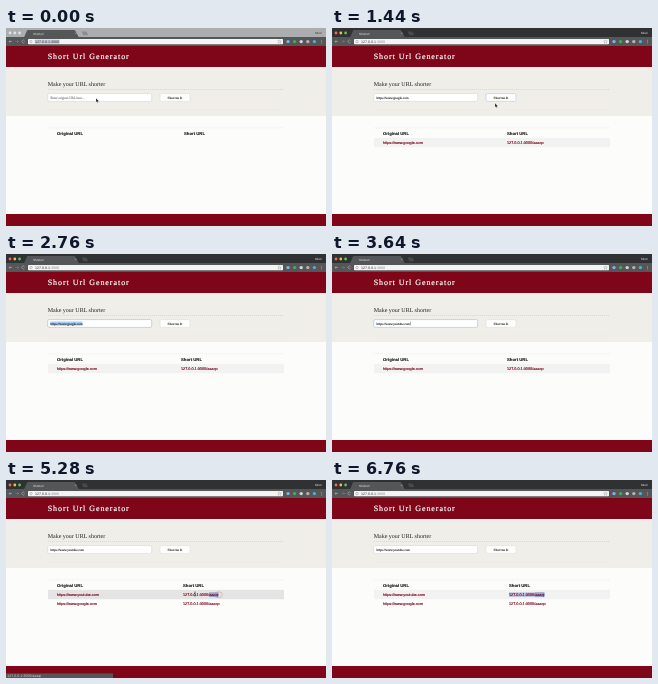
Animation, 320 px wide and 198 px high, one loop 6800 ms. Source, as an HTML page:

```html
<!DOCTYPE html>
<html lang="en">
<head>
<meta charset="utf-8">
<title>Short Url Generator</title>
<style>
html, body { margin: 0; width: 100%; height: 100%; overflow: hidden; background: #fbfcfb; }
svg { display: block; width: 100vw; height: 100vh; }
text { font-family: "Liberation Sans", Arial, sans-serif; font-size: 3.77px; text-rendering: geometricPrecision; white-space: pre; }
.serif { font-family: "Liberation Serif", Times, serif; }
.title { font-size: 8px; letter-spacing: .95px; fill: #fff; stroke: #fff; stroke-width: .2; }
.head { font-size: 4.25px; font-weight: bold; fill: #111; stroke: #111; stroke-width: .08; }
.link { fill: #78041a; stroke: #78041a; stroke-width: .14; }
.line { stroke: #d9d5cc; stroke-width: .5; stroke-dasharray: 1.2 .8; }
.icon { fill: none; stroke: #c4c4c4; stroke-width: .5; }
#entry { font-size: 3.25px; stroke-width: .1; }
</style>
</head>
<body>
<svg viewBox="0 0 320 198" preserveAspectRatio="none">
  <!-- browser -->
  <rect id="strip" width="320" height="10"/>
  <g id="lights"></g>
  <path d="M18 9.5 L21 2.6 Q21.3 2 22 2 H68 Q68.8 2 69.2 2.6 L73 9.5Z" fill="#555657"/>
  <path id="newTab" d="M75.5 3.6 h5 l1.8 3.6 h-5z"/>
  <text x="27" y="6.9" style="font-size:3px" fill="#f0f0f0">Shorturl</text>
  <path class="icon" d="M69 4.6 l1.6 1.6 m0 -1.6 l-1.6 1.6" style="stroke-width:.35"/>
  <text id="user" x="309" y="6.3" style="font-size:3px">Mirel</text>
  <rect y="9" width="320" height="9" fill="#555657"/>
  <path class="icon" d="M6 13.5 H3 m1.2 -1.2 l-1.2 1.2 l1.2 1.2"/>
  <path class="icon" d="M9.5 13.5 h3 m-1.2 -1.2 l1.2 1.2 l-1.2 1.2" stroke-opacity=".4"/>
  <path class="icon" d="M18.5 12.7 a1.4 1.4 0 1 0 .1 1.4"/>
  <rect x="22" y="11" width="255" height="5.2" rx=".8" fill="#f4f4f4"/>
  <circle cx="25" cy="13.6" r="1.2" fill="none" stroke="#777" stroke-width=".4"/>
  <rect id="urlSel" x="28.7" y="11.5" width="25" height="4.2" fill="#c3cad6"/>
  <text x="29" y="14.9" style="font-size:3.6px" fill="#333">127.0.0.1<tspan id="port">:3000</tspan></text>
  <path d="M273.5 11.8 l.5 1.3 h1.4 l-1.1 .9 l.4 1.4 l-1.2 -.8 l-1.2 .8 l.4 -1.4 l-1.1 -.9 h1.4z" fill="none" stroke="#888" stroke-width=".35"/>
  <g id="addons"></g>

  <!-- page -->
  <rect y="18" width="320" height="21" fill="#7e0618"/>
  <rect y="39" width="320" height="49" fill="#f0eee8"/>
  <rect y="88" width="320" height="98" fill="#fcfdfb"/>
  <rect y="186" width="320" height="12" fill="#7e0618"/>
  <text class="serif title" x="41.7" y="31">Short Url Generator</text>
  <text class="serif" x="41.7" y="58" style="font-size:6px" fill="#222">Make your URL shorter</text>
  <path class="line" d="M42 61.5 H278" style="stroke:#c8c4bc"/>
  <path class="line" d="M42 82 H278" style="stroke:#e6e3dc"/>
  <rect id="field" x="41.7" y="65.6" width="104" height="7.8" rx="1.4" fill="#fff" stroke-width=".5"/>
  <rect id="fieldSel" y="67.5" height="4.2" fill="#a9cdf3"/>
  <text class="serif" id="entry" x="44.5" y="70.6"></text>
  <rect id="caret" y="67.6" width=".35" height="3.8" fill="#222"/>
  <rect id="button" x="154" y="65.6" width="30" height="7.8" rx="1.4" fill="#fdfdfc" stroke-width=".5"/>
  <text class="serif" x="169" y="70.6" text-anchor="middle" style="font-size:3.4px;font-weight:bold" fill="#1a1a1a">Shorten It</text>

  <!-- table -->
  <rect id="headBand" x="42" y="100" width="236" height="9.6" fill="#f2f3f2"/>
  <rect id="band" x="42" y="109.8" width="236" height="9.5"/>
  <path class="line" d="M42 99.8 H278" style="stroke:#e8dcd8"/>
  <text class="head" x="51" y="106.5">Original URL</text>
  <text class="head" id="shortHead" y="106.5">Short URL</text>
  <rect id="linkSel" y="112.3" height="4.8" fill="#c0c5e3"/>
  <rect id="codeSel" y="112.3" height="4.8" fill="#92a8d8"/>
  <g id="rows"></g>
  <rect id="ring" x="208.5" y="112" width="7.8" height="5.6" rx="2.8" fill="none" stroke="#cf7a80" stroke-width=".4"/>

  <g id="status">
    <rect y="193.4" width="107" height="4.6" fill="#555657"/>
    <text x="1.2" y="196.9" style="font-size:3.6px" fill="#d0d0d0">127.0.0.1:3000/aaaqi</text>
  </g>
  <g id="cursor">
    <path id="arrow" d="M0 -1.8 V2.3 L1 1.4 L1.6 2.8 L2.3 2.5 L1.7 1.2 H2.9Z" fill="#111" stroke="#fff" stroke-width=".25"/>
    <path id="beam" d="M-.7 -2 H.7 M0 -2 V2 M-.7 2 H.7" fill="none" stroke="#222" stroke-width=".5"/>
  </g>
</svg>
<script>
const LOOP = 6800;
const NS = "http://www.w3.org/2000/svg";
const $ = id => document.getElementById(id);
const set = (id, attrs) => {
  for (const k in attrs) $(id).setAttribute(k, attrs[k]);
};
const show = (id, on) => $(id).setAttribute("visibility", on ? "visible" : "hidden");
const clamp = v => Math.max(0, Math.min(1, v));
const ease = v => v * v * (3 - 2 * v);

const SITES = ["https://www.google.com", "https://www.youtube.com"];
const CODES = ["aaaqo", "aaaqi"];

// time, x, y
const PATH = [
  [0, 90, 72], [760, 90, 72], [1120, 168, 70], [1240, 168, 70],
  [1440, 163, 77], [1640, 160, 76], [2120, 78, 70], [2240, 78, 70], [2520, 44, 70],
  [3640, 60, 71], [3920, 170, 70], [4060, 170, 70], [4280, 172.5, 77], [4440, 173, 79],
  [4960, 212, 114.5], [5120, 212, 114.5], [5280, 189, 114], [5400, 178, 114.5],
  [5680, 170, 92], [5880, 171, 90], [6480, 289, 6], [6600, 290, -6], [LOOP, 290, -6]
];
const HIDDEN = [[200, 740], [2600, 3660]];

function addNode(parent, tag, attrs) {
  const node = document.createElementNS(NS, tag);
  for (const k in attrs) node.setAttribute(k, attrs[k]);
  $(parent).append(node);
  return node;
}

const lights = ["#ed6a5e", "#f5bf4f", "#61c554"].map((color, i) => ({
  color,
  node: addNode("lights", "circle", { cx: 4 + i * 4.8, cy: 5, r: 1.4 })
}));
["#7fb2e5", "#3fae5c", "#d4d4d4", "#b4b4b4", "#4ab0d9"].forEach((fill, i) =>
  addNode("addons", "circle", { cx: 282 + i * 6.6, cy: 13.6, r: 1.7, fill }));
[12.2, 13.6, 15].forEach(cy => addNode("addons", "circle", { cx: 315.5, cy, r: .4, fill: "#ddd" }));

const rows = [114.5, 124].map(y => [51, 175].map(x =>
  addNode("rows", "text", { class: "link", x, y: y + 1.4 })));

function pointAt(t) {
  const i = Math.max(1, PATH.findIndex(p => p[0] > t));
  const [a, b] = [PATH[i - 1], PATH[i]];
  const k = ease(clamp((t - a[0]) / (b[0] - a[0])));
  return [a[1] + (b[1] - a[1]) * k, a[2] + (b[2] - a[2]) * k];
}

const typed = (word, t, from, to) =>
  word.slice(0, Math.floor(clamp((t - from) / (to - from)) * word.length));

function drawBrowser(t) {
  const active = t >= 120;
  set("strip", { fill: active ? "#303132" : "#acadae" });
  set("newTab", { fill: active ? "#484949" : "#8c8d8e" });
  set("user", { fill: active ? "#eee" : "#333" });
  set("port", { fill: active ? "#888" : "#333" });
  lights.forEach(({ node, color }) => node.setAttribute("fill", active ? color : "#e2e2e2"));
  show("urlSel", !active);
  show("status", t >= 4960 && t < 5480);
}

function drawForm(t) {
  const value = t >= 2960 ? typed(SITES[1], t, 2920, 3560) : typed(SITES[0], t, 200, 700);
  const entry = $("entry");
  const content = value || "Enter original URL here...";
  if (entry.textContent !== content) entry.textContent = content;
  const ink = value ? "#222" : "#777";
  set("entry", { fill: ink, stroke: ink });
  const width = value ? entry.getComputedTextLength() : 0;

  const focused = (t >= 120 && t < 1140) || (t >= 2140 && t < 3960);
  set("field", { stroke: focused ? "#83b4e3" : "#cfceca" });
  const picked = t < 2960 ? clamp((t - 2240) / 280) : 0;
  set("fieldSel", { x: 44.5 + width * (1 - picked), width: width * picked });
  show("caret", focused && picked === 0);
  set("caret", { x: 44.6 + width });

  const pressed = (t >= 1140 && t < 2140) || (t >= 3960 && t < 4960);
  set("button", { stroke: pressed ? "#9cc3e6" : "#dad8d3" });
}

function drawTable(t, y) {
  const count = t >= 4080 ? 2 : t >= 1240 ? 1 : 0;
  const x = [178, 175, 177][count];
  set("shortHead", { x });
  rows.forEach((cells, i) => {
    const n = count - 1 - i;
    cells[0].textContent = n < 0 ? "" : SITES[n];
    cells[1].textContent = n < 0 ? "" : "127.0.0.1:3000/" + CODES[n];
    cells[1].setAttribute("x", x);
  });
  show("band", count > 0);
  const hover = count === 2 && y > 109 && y < 120;
  set("band", { fill: hover ? "#e4e4e4" : "#f1f2f1" });
  show("headBand", t >= 5560 && t < 5760);

  const drag = clamp((t - 5120) / 240);
  const link = rows[0][1];
  const full = link.getComputedTextLength();
  const code = count ? full - link.getSubStringLength(0, 15) : 0;
  const part = code * clamp(drag * 2);
  set("linkSel", { x, width: t >= 5360 ? full : 0 });
  set("codeSel", { x: x + full - part, width: part });
  show("ring", t >= 5120 && t < 5400);
}

function drawCursor(t, x, y) {
  show("cursor", t < 6600 && !HIDDEN.some(([a, b]) => t >= a && t < b));
  set("cursor", { transform: `translate(${x} ${y})` });
  const selecting = (t >= 2140 && t < 2600) || (t >= 5120 && t < 5440);
  set("arrow", { display: selecting ? "none" : "inline" });
  set("beam", { display: selecting ? "inline" : "none" });
}

function draw(t) {
  const [x, y] = pointAt(t);
  drawBrowser(t);
  drawForm(t);
  drawTable(t, y);
  drawCursor(t, x, y);
}

const start = performance.now();
function tick() {
  draw((performance.now() - start) % LOOP);
  requestAnimationFrame(tick);
}
tick();
</script>
</body>
</html>
```
